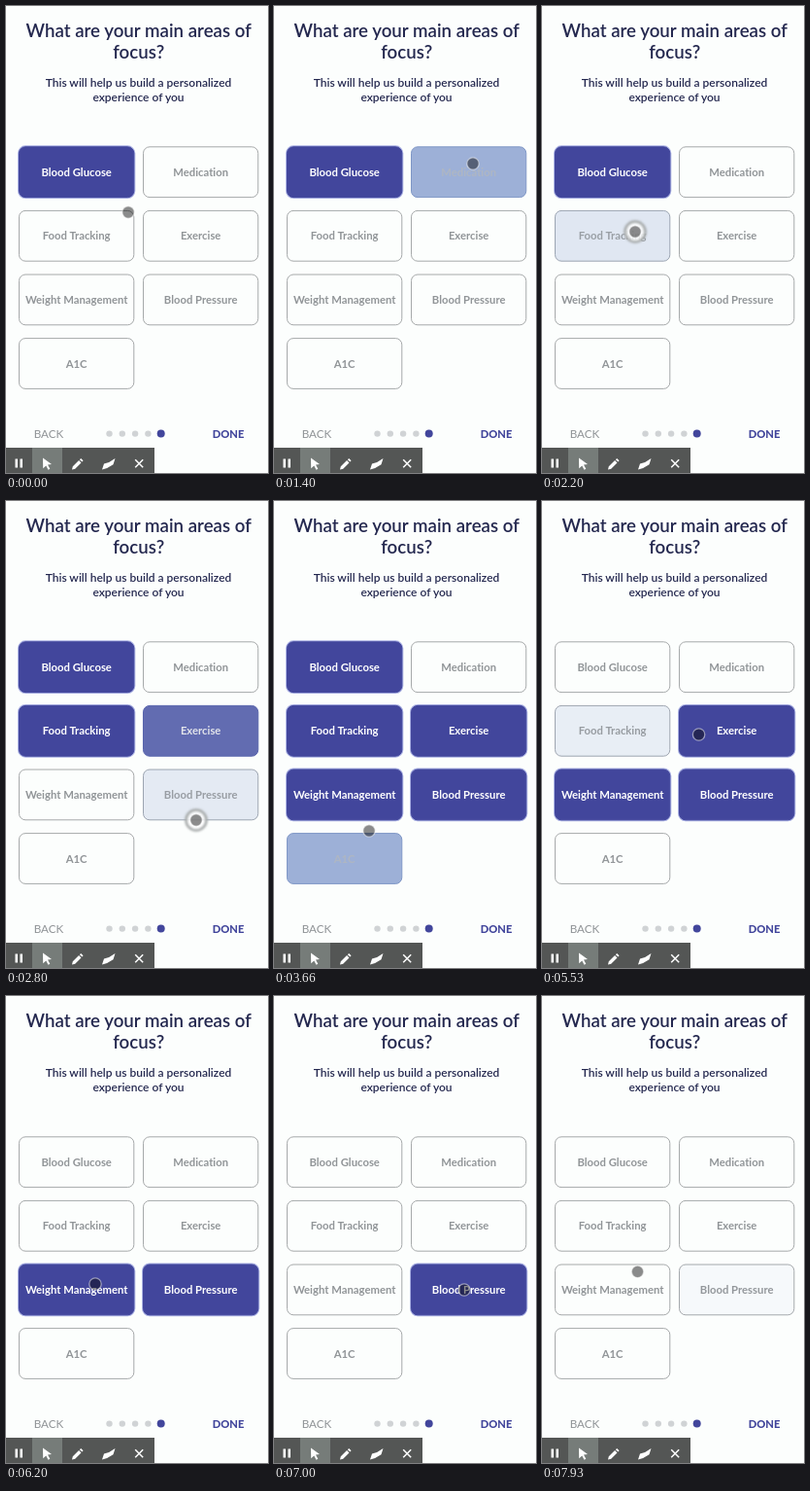
These frames come from a looping animation (270 by 480 pixels, 8 s). An HTML page:

```html
<!DOCTYPE html>
<html lang="en">
<head>
<meta charset="utf-8">
<title>Areas of focus</title>
<style>
html, body { margin: 0; width: 100%; height: 100%; overflow: hidden; background: #fcfefd; }
svg { display: block; width: 100%; height: 100%; font-family: Lato, sans-serif; font-variant-ligatures: none; }
text { text-anchor: middle; }
.title { font-size: 18.7px; font-weight: 600; fill: #24284f; }
.sub { font-size: 12px; font-weight: 600; fill: #24284f; }
.label { font-size: 11.3px; font-weight: 700; }
.glow { fill: none; stroke: #a9b0e2; stroke-width: 3; filter: blur(.7px); }
.halo { fill: #fff; fill-opacity: .8; stroke: #a4a8a8; stroke-width: 2.5; filter: blur(.8px); }
</style>
</head>
<body>
<svg viewBox="0 0 270 480">
  <rect width="270" height="480" fill="#fcfefd"/>
  <text class="title" x="136.7" y="31.5">What are your main areas of</text>
  <text class="title" x="136.7" y="53.5">focus?</text>
  <text class="sub" x="136.5" y="83">This will help us build a personalized</text>
  <text class="sub" x="136.5" y="97.5">experience of you</text>
  <g id="tiles"></g>
  <text x="44" y="444" font-size="11.7" fill="#909497">BACK</text>
  <g id="dots"></g>
  <text x="229" y="444" font-size="11.2" font-weight="800" fill="#42469c">DONE</text>
  <g fill="#fff">
    <rect y="454" width="153" height="26" fill="#545655"/>
    <rect x="27" y="454" width="31" height="26" fill="#767c79"/>
    <path d="M9.5 465.5h2.5v9h-2.5zM14.5 465.5h2.5v9h-2.5z"/>
    <path d="M38 464.5l9 6.5-4 .6 2.3 4.2-1.8 1-2.2-4.3-3.1 2.8z"/>
    <path d="M68 476.5l.8-3.2 6.3-6.3 2.4 2.4-6.3 6.3zM75.9 466.2l1.3-1.3 2.4 2.4-1.3 1.3z"/>
    <path d="M99 476.5l2-6q6-1.2 11.5-5.5l-2 6.3q-5.5 4-11.5 5.2z"/>
    <path d="M133.2 466.2l8 8m0-8l-8 8" stroke="#fff" stroke-width="1.5"/>
  </g>
  <g id="pointer">
    <circle id="press" class="halo" r="10.5"/>
    <circle r="6.2" fill="#000" fill-opacity=".45" stroke="#fff" stroke-opacity=".5" stroke-width="1.3"/>
  </g>
</svg>
<script>
const LOOP = 8000, FADE = 300, HOLD = 80, GLIDE = 300;
const WIDTH = 118.3, HEIGHT = 51.8, REACH = 5;
const WHITE = [252, 254, 253], MIST = [151, 171, 213], INDIGO = [66, 70, 156];
const GREY = [145, 149, 152], PALE = [176, 184, 198], EDGE = [166, 169, 170], STEEL = [125, 150, 200];

const $ = id => document.getElementById(id);
const clamp = v => Math.max(0, Math.min(1, v));
const smooth = v => v * v * (3 - 2 * v);
const mix = (a, b, k) => `rgb(${a.map((v, i) => Math.round(v + (b[i] - v) * k))})`;
const ramp = (a, b, c, k) => k < .5 ? mix(a, b, k * 2) : mix(b, c, k * 2 - 1);

function set(el, attrs) {
  for (const k in attrs) el.setAttribute(k, attrs[k]);
  return el;
}

function add(parent, tag, attrs) {
  const el = document.createElementNS('http://www.w3.org/2000/svg', tag);
  return parent.appendChild(set(el, attrs));
}

const names = ['Blood Glucose', 'Medication', 'Food Tracking', 'Exercise',
  'Weight Management', 'Blood Pressure', 'A1C'];

const tiles = names.map((name, i) => {
  const x = 13.5 + (i % 2) * 128, y = 144.8 + Math.floor(i / 2) * 65.6;
  const rect = { x, y, width: WIDTH, height: HEIGHT, rx: 6.5 };
  const glow = add($('tiles'), 'rect', { ...rect, class: 'glow' });
  const box = add($('tiles'), 'rect', rect);
  const text = add($('tiles'), 'text', { x: x + WIDTH / 2, y: y + 30, class: 'label' });
  text.textContent = name;
  return { x, y, glow, box, text, taps: [] };
});
tiles[0].taps.push(-LOOP);

for (let i = 0; i < 5; i++) {
  const last = i === 4;
  add($('dots'), 'circle', {
    cx: 106.5 + i * 13.3, cy: 439.6, r: last ? 4 : 3.2, fill: last ? '#42469c' : '#d0d3d5'
  });
}

// Each tap toggles the tile under it: time, x, y
const taps = [
  [1260, 205, 162], [1860, 205, 162], [2160, 96, 232], [2557, 198, 242], [2765, 196, 328],
  [3160, 92, 304], [3520, 98, 339], [4180, 98, 339], [4860, 79, 186], [5260, 86, 240],
  [5700, 194, 240], [6490, 92, 296], [7640, 196, 302]
];
const path = [[0, 126, 212], ...taps, [LOOP, 81, 280]];

for (const [time, x, y] of taps) {
  const inside = t => x > t.x && x < t.x + WIDTH && y > t.y - REACH && y < t.y + HEIGHT + REACH;
  tiles.find(inside).taps.push(time);
}

function drawTile(t, time) {
  const k = t.taps.reduce((sum, at, i) => sum + (i % 2 ? -1 : 1) * clamp((time - at) / FADE), 0);
  set(t.box, { fill: ramp(WHITE, MIST, INDIGO, k), stroke: ramp(EDGE, STEEL, INDIGO, k) });
  set(t.text, { fill: ramp(GREY, PALE, [255, 255, 255], k) });
  set(t.glow, { opacity: clamp(k * 5 - 4) });
}

// Rest briefly after a tap, then glide to the next one and wait there
function drawPointer(time) {
  const i = path.findIndex(p => p[0] > time);
  const [t0, x0, y0] = path[i - 1], [t1, x1, y1] = path[i];
  const glide = Math.min(GLIDE, t1 - t0 - HOLD);
  const k = smooth(clamp((time - t0 - HOLD) / glide));
  set($('pointer'), { transform: `translate(${x0 + (x1 - x0) * k} ${y0 + (y1 - y0) * k})` });
  set($('press'), { opacity: i > 1 ? clamp((HOLD + 40 - time + t0) / 40) : 0 });
}

const start = performance.now();
function tick() {
  const time = (performance.now() - start) % LOOP;
  tiles.forEach(t => drawTile(t, time));
  drawPointer(time);
  requestAnimationFrame(tick);
}
tick();
</script>
</body>
</html>
```
